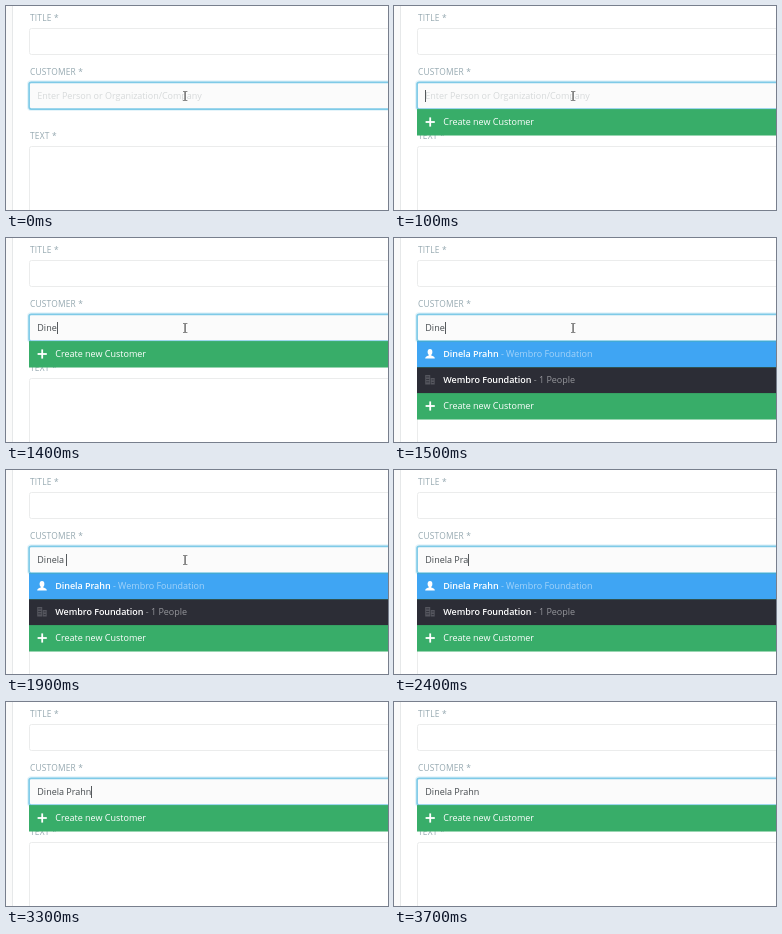
Recreate the animation shown at these times as an HTML page with a canvas. Size 382 px wide and 204 px high, loop 4.3 s.

```html
<!DOCTYPE html>
<html lang="en">
<head>
<meta charset="utf-8">
<title>Customer field</title>
<style>
  html, body { margin: 0; width: 100%; height: 100%; overflow: hidden; background: #fff; }
  canvas { display: block; width: 382px; height: 204px; }
</style>
</head>
<body>
<canvas id="stage"></canvas>
<script>
const W = 382, H = 204, LOOP = 4300;
const FONT = '"Open Sans", "Noto Sans", sans-serif';
const NAME = 'Dinela Prahn';
const COMPANY = 'Wembro Foundation';
const MENU_TOP = 103.3, ROW = 26;
const GREEN = '#38ad69';

// moment at which each character of NAME is typed
const KEYS = [900, 1100, 1300, 1400, 1600, 1800, 1900, 2100, 2300, 2400, 2500, 3300];
// spans in which the caret is lit
const CARET = [[100, 300], [800, 2500], [3300, 3700]];

const canvas = document.getElementById('stage');
const ratio = window.devicePixelRatio || 1;
canvas.width = W * ratio;
canvas.height = H * ratio;
const ctx = canvas.getContext('2d');
ctx.scale(ratio, ratio);

function rect(x, y, w, h, color) {
  ctx.fillStyle = color;
  ctx.fillRect(x, y, w, h);
}

// draws text and returns the x where it ends
function text(str, x, y, color, { size = 9, weight = 400, spacing = 0 } = {}) {
  ctx.font = `${weight} ${size}px ${FONT}`;
  ctx.letterSpacing = spacing + 'px';
  ctx.fillStyle = color;
  ctx.fillText(str, x, y);
  return x + ctx.measureText(str).width;
}

function label(str, y) {
  text(str, 24, y, '#95a8b0', { size: 8.4, spacing: 0.2 });
}

function outline(x, y, h, width, color) {
  ctx.beginPath();
  ctx.roundRect(x, y, W, h, 2);
  ctx.lineWidth = width;
  ctx.strokeStyle = color;
  ctx.stroke();
}

function box(y, h) {
  outline(23.5, y + 0.5, h - 1, 1, '#ebecec');
}

function focusBox() {
  outline(23, 76.3, 26.8, 4, '#e4f4fa');
  rect(23, 76.3, W, 26.8, '#fbfbfb');
  outline(23.1, 76.3, 26.8, 1.7, '#7fcae7');
}

function plus(y) {
  rect(31.6, y - 0.9, 9.2, 1.8, '#fff');
  rect(35.3, y - 4.6, 1.8, 9.2, '#fff');
}

function person(y) {
  ctx.fillStyle = '#fff';
  ctx.beginPath();
  ctx.ellipse(36, y - 2, 2.4, 3, 0, 0, Math.PI * 2);
  ctx.fill();
  ctx.fillRect(34.8, y, 2.4, 2);
  ctx.beginPath();
  ctx.moveTo(31.2, y + 4.4);
  ctx.quadraticCurveTo(31.2, y + 2, 36, y + 1.2);
  ctx.quadraticCurveTo(40.8, y + 2, 40.8, y + 4.4);
  ctx.fill();
}

function building(y) {
  rect(31.2, y - 5, 5, 9.5, '#55565e');
  rect(36.7, y - 2, 4, 6.5, '#55565e');
  for (let i = 0; i < 3; i++) {
    rect(32.2, y - 3.5 + i * 2.5, 3, 0.8, '#2c2d36');
    if (i) rect(37.7, y - 3 + i * 2.5, 2, 0.8, '#2c2d36');
  }
}

function row(y, color, icon, title, note, noteColor) {
  rect(23, y, W, ROW, color);
  icon(y + 12.7);
  const style = note ? { weight: 600, spacing: -0.06 } : {};
  const end = text(title, 49.3, y + 15.9, '#fff', style);
  if (note) text(' - ' + note, end, y + 15.9, noteColor);
}

function menu(t) {
  const found = t >= 1500 && t < 2500;
  let y = MENU_TOP;
  rect(23, y, W, ROW * (found ? 3 : 1), GREEN);
  if (found) {
    row(y, '#3fa5f3', person, NAME, COMPANY, '#a3d3f9');
    row(y + ROW, '#2c2d36', building, COMPANY, '1 People', '#96979c');
    y += ROW * 2;
  }
  row(y, GREEN, plus, 'Create new Customer');
}

function pointer() {
  rect(177.6, 85, 3.4, 10, 'rgba(255,255,255,.7)');
  rect(178.3, 85.3, 1.6, 9.4, '#777');
  rect(177, 85, 4.4, 1, '#888');
  rect(177, 94, 4.4, 1, '#888');
}

function draw(t) {
  rect(0, 0, W, H, '#fff');
  rect(0, 0, 6, H, '#fafafa');
  rect(6, 0, 1, H, '#e6e8e9');

  label('TITLE *', 15);
  box(22, 27);
  label('CUSTOMER *', 69);
  label('TEXT *', 133);
  box(140, 90);
  focusBox();

  const typed = NAME.slice(0, KEYS.filter(k => t >= k).length);
  let end = 31;
  if (typed) end = text(typed, 31.3, 93, '#43484c');
  else text('Enter Person or Organization/Company', 31.3, 93, '#d6d9da', { spacing: -0.02 });

  if (CARET.some(([on, off]) => t >= on && t < off)) {
    rect(Math.round(end), 84, 1, 12, '#55595c');
  }
  if (t < 2000) pointer();
  if (t >= 100) menu(t);
}

const start = performance.now();
function tick() {
  draw((performance.now() - start) % LOOP);
  requestAnimationFrame(tick);
}
tick();
</script>
</body>
</html>
```
